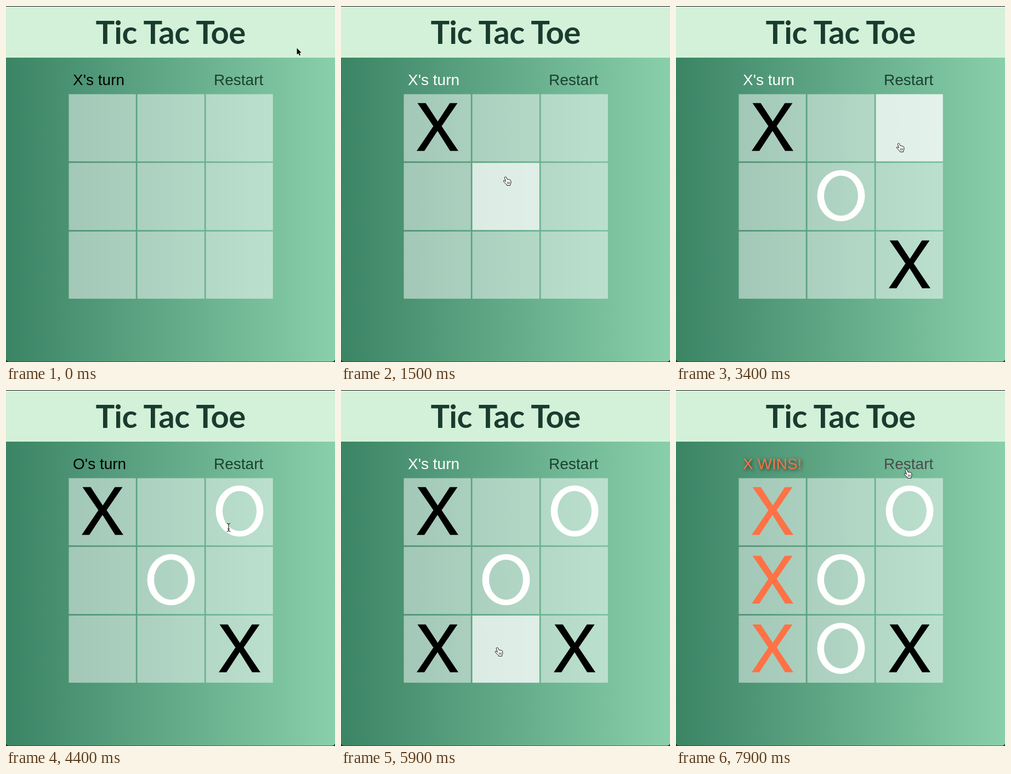
An HTML page for the animation above (8000 ms loop, 600 by 648 pixels).

```html
<!DOCTYPE html>
<html lang="en">
<head>
<meta charset="utf-8">
<title>Tic Tac Toe</title>
<style>
  html, body { margin: 0; width: 100%; height: 100%; overflow: hidden; background: #1c1c1c; }
  svg { display: block; }
  .title { font: 700 58px Lato, sans-serif; letter-spacing: -.6px; fill: #1a3c2f; }
  .label { font: 28px "Liberation Sans", Arial, sans-serif; white-space: pre; }
  .cell { fill: #fff; fill-opacity: .49; }
  .cell.hover { fill-opacity: .79; }
  .X { fill: #000; }
  .O { fill: #fff; }
  .win { fill: #ff7245; }
  #status.win { filter: drop-shadow(2px 2px 3px rgba(0, 0, 0, .65)); }
  #restart { fill: #1b4030; }
  #restart.hover { fill: #4b4b4b; }
</style>
</head>
<body>
<svg width="600" height="648" viewBox="0 0 600 648">
  <defs>
    <linearGradient id="green">
      <stop stop-color="#3b8464"/>
      <stop offset="1" stop-color="#89cfab"/>
    </linearGradient>
    <!-- marks are centred on their cell -->
    <path id="X" d="M-36.5-43.5H-21.5L.5-10L22.5-43.5H36.5L7.5-1.5L38 43.5H23L0 7L-24 43.5H-38L-7.5-1.5Z"/>
    <path id="O" fill-rule="evenodd" d="M-43.5 0A43.5 46.5 0 0 1 43.5 0A43.5 46.5 0 0 1-43.5 0ZM-31 0A31 36.5 0 0 0 31 0A31 36.5 0 0 0-31 0Z"/>
    <path id="bar" d="M-3-7.5Q0-7.5 0-5.5V5.5Q0 7.5-3 7.5M3-7.5Q0-7.5 0-5.5M0 5.5Q0 7.5 3 7.5M-1.5 3H1.5"/>
  </defs>
  <rect y="60" width="600" height="587.5" rx="5" fill="url(#green)"/>
  <rect y="1" width="600" height="93" fill="#d3f1d8"/>
  <text class="title" x="300" y="68.7" text-anchor="middle">Tic Tac Toe</text>
  <text class="label" id="status" x="122" y="144"></text>
  <text class="label" id="restart" x="379" y="144">Restart</text>
  <g id="board"></g>
  <g id="cursor" stroke-linejoin="round" stroke-linecap="round">
    <path id="arrow" d="M.5 .5V12.5L3.2 10L5 14.2L7 13.3L5.2 9.3H8.8Z" stroke="#fff" stroke-width="1.4" paint-order="stroke"/>
    <g id="hand" fill="#fff" stroke="#000" stroke-width=".9">
      <path d="M-1.6 .8Q-.2-1.2 1.3 .6L3 4.6Q4 3.6 5 4.9Q6.3 4 7.2 5.4Q8.8 4.6 9.5 6.4L10 10Q10 12 8.8 13.6L8.6 15.6H2.5L2 14Q-1 11.6-3.6 8.2Q-4.2 6.4-2.3 6.6L.2 8.4Z"/>
      <path d="M3.4 9.4V12.6M5.4 9.4V12.6M7.3 9.4V12.6" stroke-width=".7"/>
    </g>
    <g id="beam" fill="none">
      <use href="#bar" stroke="#fff" stroke-width="2.4" stroke-opacity=".7"/>
      <use href="#bar" stroke="#000"/>
    </g>
  </g>
</svg>
<script>
const LOOP = 8000, STEP = 100;
const GLIDE = 600, HOLD = 300; // travel before a stop, pause before its click
const LEFT = 114.5, TOP = 160.5, SIZE = 122.3, PITCH = 125;
const WINNERS = [0, 3, 6];

// pointer stops: arrival time, x, y
const stops = [
  [0, 530, 76], [600, 200, 215], [1500, 300, 311], [2600, 394, 428], [3400, 406, 250],
  [5300, 208, 451], [6000, 290, 470], [7000, 180, 352], [7900, 420, 145]
];

const $ = id => document.getElementById(id);
const column = cell => cell % 3;
const row = cell => Math.floor(cell / 3);
const easeOut = u => 1 - (1 - u) ** 2;

function cellAt(x, y) {
  const cx = (x - LEFT) / PITCH, cy = (y - TOP) / PITCH;
  const inside = v => v >= 0 && v < 3 && v % 1 < SIZE / PITCH;
  return inside(cx) && inside(cy) ? Math.floor(cy) * 3 + Math.floor(cx) : -1;
}

// every stop on the board ends in a click that fills its cell
const moves = stops.slice(1, -1).map(([time, x, y], i) => ({
  time: time + HOLD, cell: cellAt(x, y), mark: i % 2 ? "O" : "X"
}));
const winTime = moves[moves.length - 1].time;

function add(tag, attrs) {
  const node = document.createElementNS("http://www.w3.org/2000/svg", tag);
  for (const key in attrs) node.setAttribute(key, attrs[key]);
  return $("board").appendChild(node);
}

const cells = Array.from({ length: 9 }, (_, i) => add("rect", {
  class: "cell", x: LEFT + column(i) * PITCH, y: TOP + row(i) * PITCH, width: SIZE, height: SIZE
}));

const marks = moves.map(({ cell, mark }) => add("use", {
  href: "#" + mark, x: 176 + column(cell) * PITCH, y: 220.3 + row(cell) * PITCH
}));

function position(t) {
  const next = stops.findIndex(([time]) => time > t);
  if (next < 0) return stops[stops.length - 1].slice(1);
  const [t0, x0, y0] = stops[next - 1], [t1, x1, y1] = stops[next];
  const leave = Math.max(t1 - GLIDE, t0 && t0 + HOLD);
  const u = easeOut(Math.max(0, (t - leave) / (t1 - leave)));
  return [x0 + (x1 - x0) * u, y0 + (y1 - y0) * u];
}

function showPointer(t, played) {
  const [x, y] = position(t);
  const cell = cellAt(x, y);
  const filled = played.some(move => move.cell === cell);
  const open = cell >= 0 && !filled && t < winTime;
  const restart = x > 377 && x < 470 && y > 118 && y < 150;
  const kind = open || restart ? "hand" : filled ? "beam" : "arrow";

  cells.forEach((node, i) => node.classList.toggle("hover", open && i === cell));
  $("restart").classList.toggle("hover", restart);
  for (const id of ["arrow", "hand", "beam"]) $(id).style.display = id === kind ? "" : "none";
  $("cursor").setAttribute("transform", `translate(${x} ${y})`);
}

function showStatus(played, won) {
  const last = played.length ? played[played.length - 1].mark : "X";
  const color = played.length % 2 ? "O" : "X"; // tinted for the player to come
  $("status").textContent = won ? "X WINS!" : last + "'s turn";
  $("status").setAttribute("class", "label " + (won ? "win" : color));
}

function draw(t) {
  const played = moves.filter(move => move.time <= t);
  const won = t >= winTime;
  marks.forEach((node, i) => {
    const { cell, mark } = moves[i];
    node.style.display = i < played.length ? "" : "none";
    node.setAttribute("class", won && WINNERS.includes(cell) ? "win" : mark);
  });
  showStatus(played, won);
  showPointer(t, played);
}

let start;
function tick(now) {
  start ??= now;
  draw(Math.floor((now - start) % LOOP / STEP) * STEP);
  requestAnimationFrame(tick);
}
draw(0);
requestAnimationFrame(tick);
</script>
</body>
</html>
```
